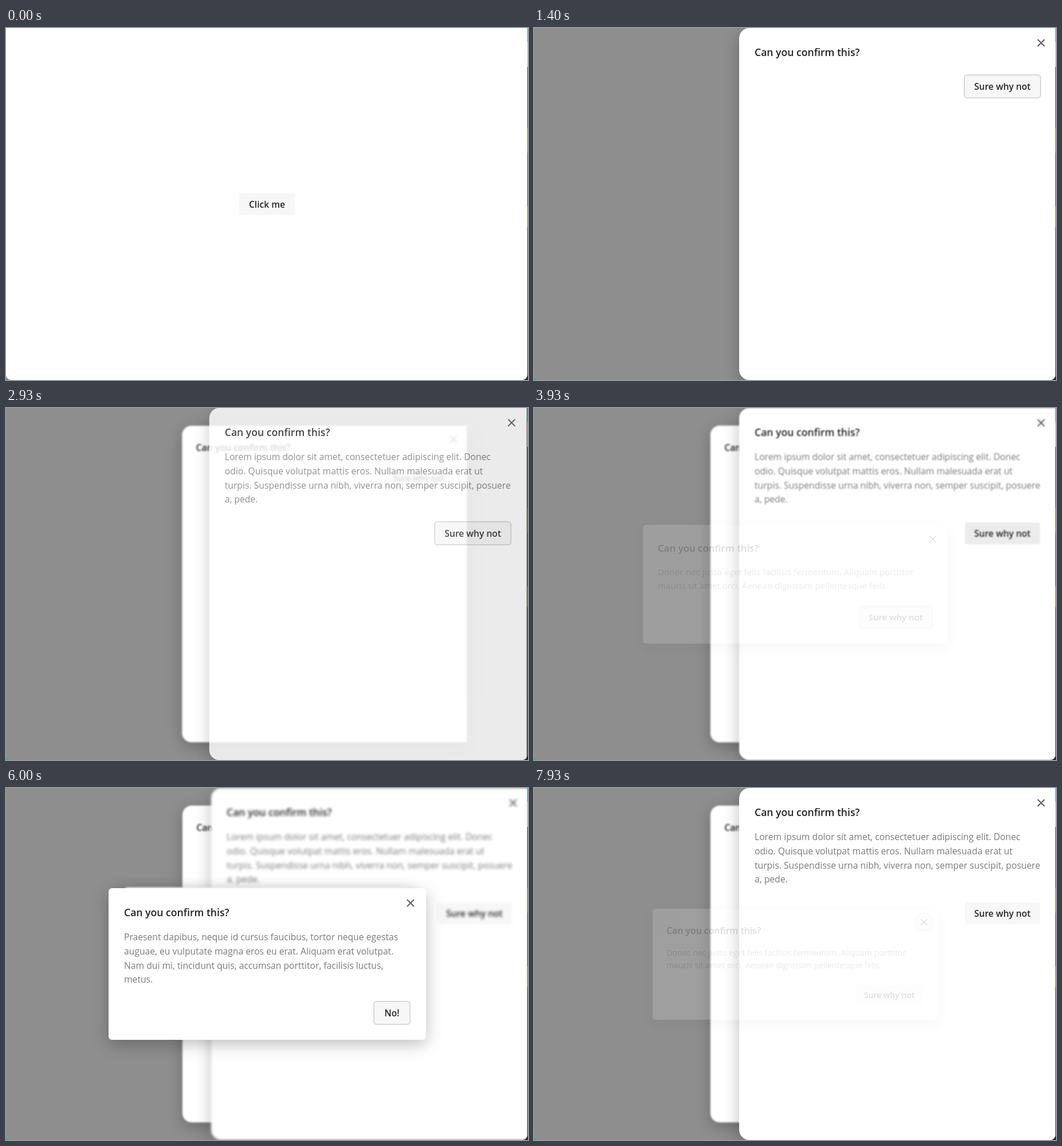
Animation of 911x615 px, one loop 8 s. Source, as an HTML page:

```html
<!DOCTYPE html>
<html lang="en">
<head>
<meta charset="utf-8">
<title>Stacked dialogs</title>
<style>
html, body { margin: 0; width: 100%; height: 100%; overflow: hidden; }
body {
  position: relative;
  background: linear-gradient(#2297a5 0 24px, #a9adb0 24px 68px, #33373c 68px 175px,
    #6a5c38 175px 218px, #33373c 218px 312px, #77663a 312px 348px, #2b2d31 348px);
  font: 400 15.7px/26px "Open Sans", "Noto Sans", sans-serif;
  color: #222;
}
div, button, span, svg { position: absolute; box-sizing: border-box; }
span { white-space: nowrap; left: 27px; }
#corner { left: 0; bottom: 0; width: 20px; height: 20px; background: #4a9da6; }
#page {
  left: 0; top: 0; width: 910px; height: 615px; overflow: hidden;
  background: #fff; border-radius: 0 0 9px 9px;
}
#dim { inset: 0; background: rgba(0, 0, 0, .443); }
button {
  height: 38px; padding: 0; border: 0; border-radius: 4px; background: #f7f7f7;
  font: 600 15.6px/37px "Open Sans", "Noto Sans", sans-serif; color: #262626; text-align: center;
}
button.ring { box-shadow: 0 0 0 2px #d8d8d8; }
.dialog { background: #fff; box-shadow: 0 8px 28px rgba(0, 0, 0, .25); }
.panel { border-radius: 18px 0 0 18px; }
.card { border-radius: 6px; }
.title { font-size: 17.6px; font-weight: 600; top: 29px; }
.text { color: #7a7a7a; }
svg { left: 509px; top: 8.4px; width: 36px; height: 36px; fill: none; stroke: #606060; stroke-width: 2.1; }
circle { stroke: #d8d8d8; stroke-width: 2; fill: #f7f7f7; }
</style>
</head>
<body>
<div id="corner"></div>
<div id="page">
  <button style="left:407px;top:289px;width:97px">Click me</button>
  <div id="dim"></div>
</div>
<script>
const LOOP = 8000, FPS = 15, SPAN = 330;
const NEVER = 1e6;
const page = document.getElementById("page");
const dim = document.getElementById("dim");

// from: slide-in offset; back: x, y offset and shrink while another dialog is on top
const dialogs = [
  { kind: "panel", x: 358, y: 0, w: 553, h: 615, from: 255, back: [-77.8, 0, .1],
    open: 994, close: NEVER, cover: 2662, uncover: NEVER,
    label: "Sure why not", by: 83, bw: 131, lines: [] },
  { kind: "panel", x: 358, y: 0, w: 553, h: 615, from: 255, back: [0, 0, 0],
    open: 2662, close: NEVER, cover: 3885, uncover: 7652,
    label: "Sure why not", by: 200, bw: 131, lines: [
      "Lorem ipsum dolor sit amet, consectetuer adipiscing elit. Donec",
      "odio. Quisque volutpat mattis eros. Nullam malesuada erat ut",
      "turpis. Suspendisse urna nibh, viverra non, semper suscipit, posuere",
      "a, pede."] },
  { kind: "card", x: 179, y: 200, w: 553.5, h: 216, from: 0, back: [0, -37.4, .1],
    open: 3885, close: 7652, cover: 5620, uncover: 6850,
    label: "Sure why not", by: 149, bw: 131, lines: [
      "Donec nec justo eget felis facilisis fermentum. Aliquam porttitor",
      "mauris sit amet orci. Aenean dignissim pellentesque felis."] },
  { kind: "card", x: 179, y: 175, w: 553.5, h: 265, from: 0, back: [0, 0, 0],
    open: 5620, close: 6850, cover: NEVER, uncover: NEVER,
    label: "No!", by: 199, bw: 61, lines: [
      "Praesent dapibus, neque id cursus faucibus, tortor neque egestas",
      "auguae, eu vulputate magna eros eu erat. Aliquam erat volutpat.",
      "Nam dui mi, tincidunt quis, accumsan porttitor, facilisis luctus,",
      "metus."] }
];

function build(d) {
  const el = document.createElement("div");
  el.className = `dialog ${d.kind}`;
  el.style.cssText = `left:${d.x}px;top:${d.y}px;width:${d.w}px;height:${d.h}px`;
  const lines = d.lines.map((s, i) =>
    `<span class="text" style="top:${72 + i * 24.8}px">${s}</span>`).join("");
  el.innerHTML = `<span class="title">Can you confirm this?</span>${lines}
    <button style="left:${525 - d.bw}px;top:${d.by}px;width:${d.bw}px">${d.label}</button>
    <svg viewBox="-18 -18 36 36"><circle r="16.5"/><path d="M-6-6L6 6M6-6L-6 6"/></svg>`;
  page.append(el);
  d.el = el;
  d.button = el.querySelector("button");
  d.halo = el.querySelector("circle");
}

const clamp = v => Math.min(1, Math.max(0, v));
const since = (t, start) => clamp((t - start) / SPAN);
const cubic = (a, b, s) => 3 * (1 - s) ** 2 * s * a + 3 * (1 - s) * s * s * b + s ** 3;

// Bezier ease with a slight overshoot
function ease(x) {
  if (x <= 0 || x >= 1) return clamp(x);
  let lo = 0, hi = 1;
  for (let i = 0; i < 24; i++) {
    const mid = (lo + hi) / 2;
    if (cubic(.2, .3, mid) < x) lo = mid; else hi = mid;
  }
  return cubic(1, 1.055, lo);
}

function pose(d, t) {
  const alpha = since(t, d.open) - since(t, d.close);
  const shown = ease(since(t, d.open)) - ease(since(t, d.close));
  const behind = ease(since(t, d.cover)) - ease(since(t, d.uncover));
  const [bx, by, shrink] = d.back;
  const dx = d.from * (1 - shown) + bx * behind;
  const scale = (.9 + .1 * shown) * (1 - shrink * behind);
  const blur = 2 * clamp(behind);
  const s = d.el.style;
  s.display = alpha > 0 ? "block" : "none";
  s.opacity = alpha;
  s.transform = `translate(${dx}px,${by * behind}px) scale(${scale})`;
  s.filter = blur > .02 ? `blur(${blur}px)` : "none";

  const covered = t > d.cover && t < d.uncover;
  const closing = t > d.close;
  const isPanel = d.kind === "panel";
  const pressed = isPanel && covered && t < dialogs[3].open;
  const focused = !covered && !closing && !(isPanel && t > d.uncover);
  d.button.classList.toggle("ring", focused);
  d.button.style.background = pressed ? "#ececec" : "#f7f7f7";
  d.halo.style.display = closing ? "inline" : "none";
}

function draw(ms) {
  const step = Math.floor((ms % LOOP + 5) * FPS / 1000) % (LOOP * FPS / 1000);
  const t = step * 1000 / FPS;
  dim.style.opacity = since(t, dialogs[0].open);
  dialogs.forEach(d => pose(d, t));
}

dialogs.forEach(build);
const start = performance.now();
function tick() {
  draw(performance.now() - start);
  requestAnimationFrame(tick);
}
tick();
</script>
</body>
</html>
```
